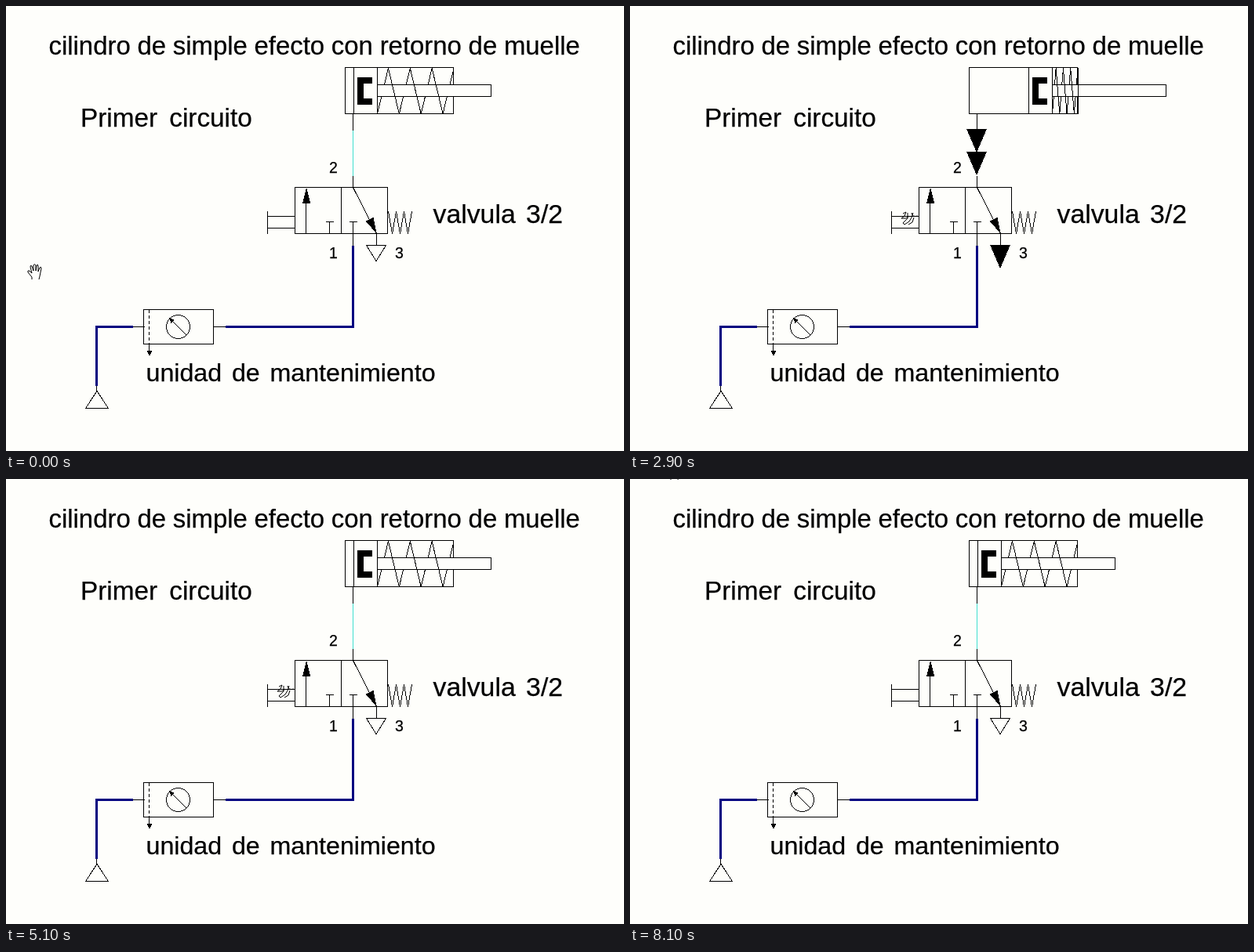
An HTML page for the animation above (8600 ms loop, 788x568 px).

```html
<!DOCTYPE html>
<html lang="es">
<head>
<meta charset="utf-8">
<title>Circuito neumático</title>
<style>
  html, body { margin: 0; width: 100%; height: 100%; overflow: hidden; background: #fefefb; }
  svg { display: block; width: 788px; height: 568px; }
  text { font-family: "Liberation Sans", Arial, sans-serif; fill: #000; stroke: #000; stroke-width: .25; white-space: pre; }
  .draw { fill: none; stroke: #000; stroke-width: 1; shape-rendering: crispEdges; }
  .solid { fill: #000; stroke: none; }
  .paper { fill: #fefefb; }
  .pipe { stroke: #000080; stroke-width: 3; }
</style>
</head>
<body>
<svg viewBox="0 0 788 568">
  <g class="draw" transform="translate(.5 .5)">
    <!-- supply and service unit -->
    <path d="M115.500 491L101 513H130ZM115 484V491M161 409H176M264 409H279"/>
    <path class="pipe" d="M161 409H115V484M279 409H442V305"/>
    <rect x="175" y="387" width="89" height="44"/>
    <path d="M182 387V431" stroke-dasharray="4 3"/>
    <path d="M182 431V441M208 398L230 420"/>
    <path class="solid" d="M179 439H186L182.500 447ZM207 397L214 400L210 404Z"/>
    <circle cx="219" cy="409" r="15"/>

    <!-- valve connections -->
    <path d="M442 137V158M442 216V231M442 290V305M472 290V305"/>
    <path id="outlet" d="M442 158V216"/>
    <path id="exhaust" d="M459 305H484L471.500 325Z"/>

    <!-- valve -->
    <g id="valve">
      <path d="M367.800 231H486.300V290H367.800ZM426.800 231V290M382.300 290V240M407 275H417M411.800 275V290M437 275H447M441.800 275V290M442 231L472 290"/>
      <path d="M333 261V290M333 268H368M333 283H368"/>
      <path class="solid" d="M382.500 231L377.500 251H387.500ZM472 290L458 274L468 269Z"/>
      <path d="M487 262l5 28l5 -28l5 28l5 -28l5 28l5 -28"/>
    </g>

    <!-- cylinder, with the spring coiled around the rod -->
    <rect x="432" y="78" width="138" height="59"/>
    <path id="backCoils"/>
    <g id="piston">
      <rect class="paper" x="473" y="100" width="145.200" height="15"/>
      <path d="M443 78V137M473 78V137"/>
      <path class="solid" d="M447 90H466V98H455V117H466V125H447Z"/>
    </g>
    <path id="frontCoils"/>
    <path id="stop" d="M571 78V137"/>

    <path id="flow" class="solid"/>
  </g>

  <g id="labels"></g>

  <g fill="none" stroke="#000">
    <path id="hand" class="paper" d="M6 21V18L1 12Q0 9 3 10L6 13L4 5Q4 2 6 4L8 10V3Q9 0 11 3V10L12 3Q14 1 14 4V11L16 6Q18 4 18 7L16 17L15 21"/>
    <path id="grip" d="M348 265L352 263L350 268L346 271H352L356 268M354 264V271L348 277L350 279L356 275L359 270L361 264M355 279L360 276L362 270"/>
    <path id="gripEdge" d="M359 264Q360 270 367 268"/>
  </g>
</svg>
<script>
const $ = id => document.getElementById(id);
const LOOP = 8600, STROKE = 98.4, SHIFT = 59.5;

// text, x, baseline, size, extra word spacing
const labels = [
  ["cilindro de simple efecto con retorno de muelle", 54.5, 61.5, 32.9, -0.4],
  ["Primer circuito", 95, 153.5, 33.3, 6],
  ["valvula 3/2", 544.5, 276.5, 33.8, 4],
  ["unidad de mantenimiento", 178.5, 478.5, 32.2, 3.8],
  ["2", 412, 213, 19.5, 0],
  ["1", 412, 322, 19.5, 0],
  ["3", 496, 322, 19.5, 0]
];
$("labels").innerHTML = labels.map(([s, x, y, size, gap]) =>
  `<text x="${x}" y="${y}" font-size="${size}" word-spacing="${gap}">${s}</text>`).join("");

const up = (x, y) => `M${x} ${y}l-13 30h26z`;
const down = (x, y) => `M${x} ${y}l-13 -30h26z`;
const right = (x, y) => `M${x} ${y}l-30 -12.5v25z`;

const fillArrows = up(115.5, 453.5) + right(160.5, 409) + right(308.5, 409) +
  up(441.5, 304.5) + up(441.5, 155.5) + up(441.5, 185.5);
const ventArrows = down(441.5, 186.5) + down(441.5, 215.5) + down(471.5, 334.5);

// button pressed, button released, arrows shown while filling
const presses = [[2400, 2900, false], [4000, 4600, true], [6500, 7000, true]];

// time, x, y
const approach = [[0, 27, 328], [900, 118, 318], [1500, 345, 262]];
const leave = [[7300, 300, 263], [7800, 0, 298], [7900, 15, 190], [8000, 35, 80], [8100, 46, -20]];

function along(path, t) {
  let i = 1;
  while (i < path.length - 1 && t > path[i][0]) i++;
  const [t0, x0, y0] = path[i - 1], [t1, x1, y1] = path[i];
  const k = Math.min(1, Math.max(0, (t - t0) / (t1 - t0)));
  return [x0 + (x1 - x0) * k, y0 + (y1 - y0) * k];
}

function state(t) {
  for (const [on, off, arrows] of presses) {
    if (t >= on && t < off)
      return { pressed: true, ext: STROKE, filling: arrows && t < on + 100 };
    if (t >= off && t < off + 200)
      return { ext: t < off + 100 ? 65 : 33, venting: true };
  }
  return { ext: 0 };
}

const show = (id, on) => $(id).style.display = on ? "" : "none";

// front coils run down from the top, back coils run up behind the rod
function coils(ext, front) {
  const step = (570.5 - 473 - ext) / 7;
  let d = "";
  for (let i = front ? 1 : 0; i < 7; i += 2) {
    const x = 473 + ext + i * step;
    d += `M${x} ${front ? 79 : 137}L${x + step} ${front ? 137 : 79}`;
  }
  return d;
}

function render(ms) {
  const t = Math.floor(ms % LOOP / 100) * 100;
  const { pressed, ext, filling, venting } = state(t);

  $("valve").setAttribute("transform", `translate(${pressed ? SHIFT : 0} 0)`);
  $("piston").setAttribute("transform", `translate(${ext} 0)`);
  for (const id of ["backCoils", "frontCoils"]) {
    $(id).setAttribute("d", coils(ext, id === "frontCoils"));
    show(id, ext < STROKE);
  }
  show("stop", ext > 0);

  $("flow").setAttribute("d", filling ? fillArrows : venting ? ventArrows : "");
  show("exhaust", !venting);
  show("outlet", !filling && !venting);
  $("outlet").style.stroke = pressed ? "#000080" : "#40e0d0";
  $("outlet").style.strokeWidth = pressed ? 3 : 1;

  const gripping = t >= 1500 && t < 7300;
  show("hand", !gripping);
  show("grip", gripping);
  show("gripEdge", gripping && !pressed);
  const [x, y] = along(t < 1500 ? approach : leave, t);
  $("hand").setAttribute("transform", `translate(${x} ${y})`);
}

const start = performance.now();
function tick() {
  render(performance.now() - start);
  requestAnimationFrame(tick);
}
render(0);
requestAnimationFrame(tick);
</script>
</body>
</html>
```
